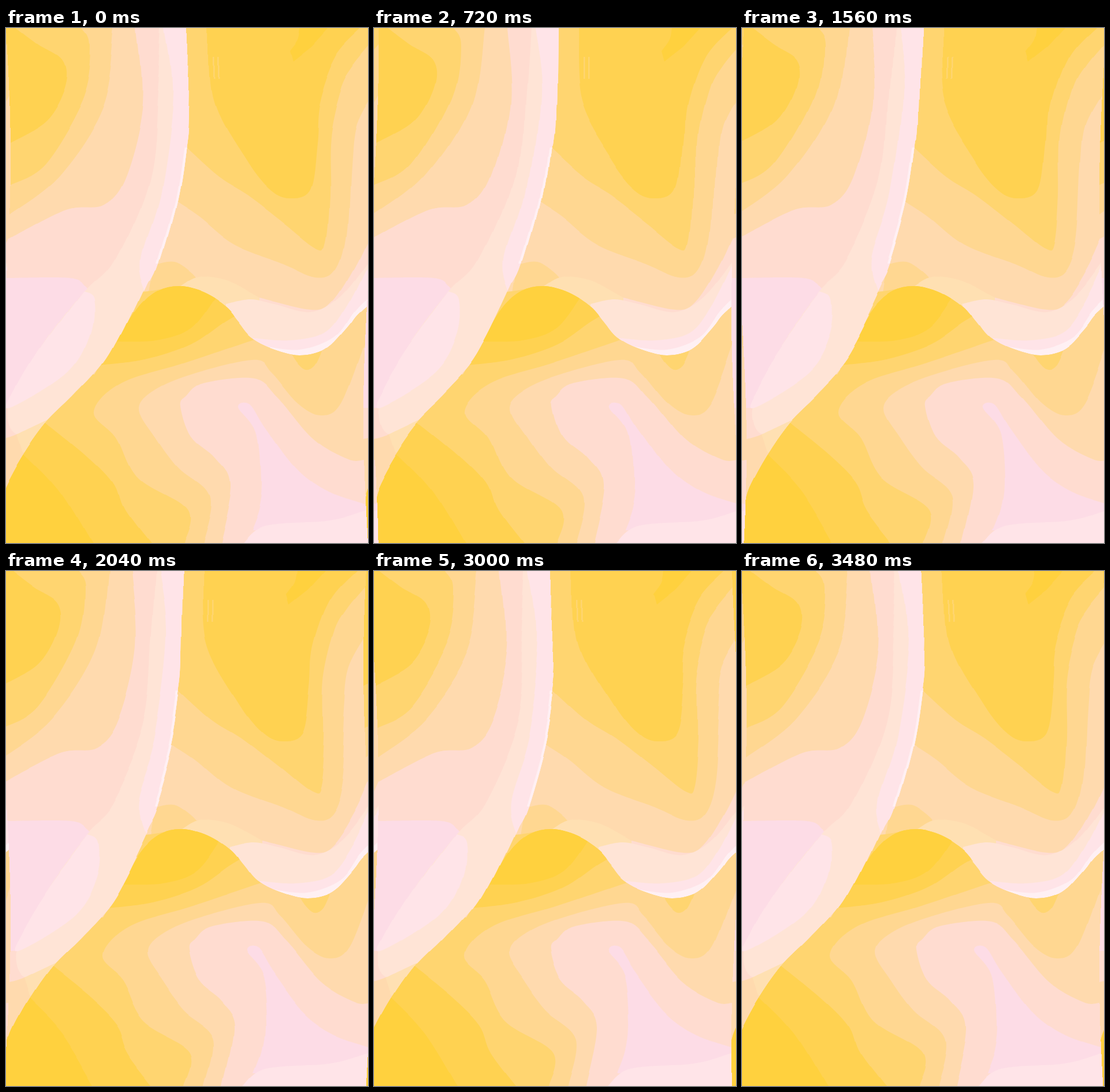
An HTML page with a canvas for the animation above (3600 ms loop, 627 by 892 pixels).

```html
<!DOCTYPE html>
<html lang="en">
<head>
<meta charset="utf-8">
<title>Liquid waves</title>
<style>
  html, body { margin: 0; width: 100%; height: 100%; overflow: hidden; }
  canvas { display: block; width: 627px; height: 892px; }
</style>
</head>
<body>
<canvas id="stage" width="627" height="892"></canvas>
<script>
const W = 627, H = 892, LOOP = 3600, STEP = 120, SWAY = 8;
const gold = '#ffd13e', amber = '#ffd251', honey = '#ffd570', sand = '#ffd791',
  apricot = '#ffdaae', blush = '#ffdcd0', lilac = '#fddce6', cream = '#ffe4d6',
  rose = '#ffe4e8', butter = '#ffe0b2', white = '#fff0f3';

const stage = document.getElementById('stage').getContext('2d');
const artwork = document.createElement('canvas');
artwork.width = W;
artwork.height = H;
const art = artwork.getContext('2d');

const parse = text => text ? text.split(' ').map(p => p.split(',').map(Number)) : [];
const mix = (a, b, t) => a.map((p, i) => p.map((v, k) => v + (b[i][k] - v) * t));
const moved = (points, dx) => points.map(([x, y]) => [x + dx, y]);

// Smooth curve through key points, closed by straight lines through the corners.
function outline(points, corners) {
  const p = typeof points === 'string' ? parse(points) : points;
  const path = new Path2D();
  path.moveTo(...p[0]);
  for (let i = 0; i < p.length - 1; i++) {
    const a = p[i - 1] || p[i], b = p[i], c = p[i + 1], d = p[i + 2] || c;
    path.bezierCurveTo(
      b[0] + (c[0] - a[0]) / 6, b[1] + (c[1] - a[1]) / 6,
      c[0] - (d[0] - b[0]) / 6, c[1] - (d[1] - b[1]) / 6, c[0], c[1]);
  }
  parse(corners).forEach(c => path.lineTo(...c));
  path.closePath();
  return path;
}

function shape(color, points, corners) {
  art.fillStyle = color;
  art.fill(outline(points, corners));
}

function within(path, draw) {
  art.save();
  art.clip(path);
  draw();
  art.restore();
}

function fillAll(color) {
  art.fillStyle = color;
  art.fillRect(0, 0, W, H);
}

const ribbon = parse('312,0 310,150 305.5,207 291,300 261,408 243,447 220,496 197,542 171,584 122,637 75,684 35,741 8,790 0,812');
const wave = parse('160,600 203,528 232,482 264,455 302,447 345,458 384,483 406,509 429,536 465,555 514,567 558,556 594,520 610,499 627,483');

function valley() {
  fillAll(apricot);
  shape(sand, '291,301 330,327 391,375 478,409 534,432 567,420 585,360 592,240 600,170 627,117', '627,0 200,0 200,301');
  shape(honey, '305,207 362,258 413,290 474,337 532,382 548,372 555,290 556,190 575,105 596,66 627,28', '627,0 200,0 200,207');
  shape(amber, '347,0 354,125 407,225 448,278 483,295 520,280 532,200 538,130 567,50 612,0');
  shape(gold, '508,0 504,20 490,40', '495,58 528,32 557,0');
  art.fillStyle = honey;
  for (const x of [355, 363]) art.fillRect(x, 50, 2.5, 38);

  shape(sand, '255,410 290,405 321,425 331,440 329,452', '240,500');
  shape(honey, '238,457 260,454 288,448', '270,470 190,540');
  shape(butter, '302,447 334,431 385,438 440,467 470,480', '440,560');
  shape(blush, '440,467 530,488 565,474 603,415 627,364', '627,600 440,600');
  shape(cream, '383,478 425,470 470,479 530,492 580,465 627,406', '627,600 383,600');
  shape(rose, '433,537 495,541 555,528 592,482 627,412', '627,600 433,600');
  shape(white, '452,551 515,557 573,535 606,492 627,470', '627,600 452,600');
}

// The apricot fold runs midway between the honey and blush folds.
function folds() {
  const outer = parse('435,540 316,580 207,615 160,665 198,710 235,780 318,834 310,892');
  const inner = parse('437,607 350,615 320,637 310,655 328,708 369,745 394,790 375,892');
  const middle = mix(outer, inner, 0.52);
  fillAll(honey);
  shape(sand, outer, '627,892 627,400 435,500');
  shape(apricot, [...parse('627,548 588,650 553,671 513,650 467,597'), ...middle], '627,892');
  shape(blush, [...parse('627,748 600,747 540,712 478,640'), ...inner], '627,892');
  shape(lilac, '429,870 443,830 448,780 440,700 410,657 430,652 458,695 511,765 564,803 627,825', '627,870');
  shape(rose, '627,835 563,853 452,862 412,892', '627,892');

  shape(amber, '73,682 142,738 190,787 210,835 253,892', '0,892 0,682');
  shape(gold, '36,738 95,800 152,892', '0,892 0,738');
  shape(amber, '168,584 246,574 325,548 380,511 400,499', '400,440 168,440');
  shape(gold, '190,543 265,541 324,520 366,466', '366,440 190,440');
  shape(honey, '498,560 511,580 526,592 541,585 553,560');
}

function sheet() {
  fillAll(blush);
  shape(apricot, '223,0 231,130 202,255 163,306 98,315 0,365', '0,0');
  shape(sand, '184,0 163,135 87,255 0,323', '0,0');
  shape(honey, '130,0 143,30 129,120 62,235 0,272', '0,0');
  shape(amber, '16,0 53,28 95,56 98,100 65,160 0,199', '0,0');
  shape(lilac, '0,433 110,433 137,447', '150,460 100,600 13,658 0,658');
  shape(apricot, '0,712 26,704 85,676', '85,830 0,830');
  shape(cream, '265,0 258,110 244,260 187,400 137,456 67,550 13,650 26,703 85,676', '330,600 330,0');
  shape(butter, '26,704 85,676', '85,735 36,735');
  shape(rose, '137,456 155,470 151,530 112,597 14,658 22,625 67,550 137,456');
  shape(rose, '272,0 284,115 263,285 230,400 240,458', '330,420 330,0');
  shape(white, moved(ribbon.slice(2, 5), -4), '330,408 330,207');
}

valley();
within(outline(wave, `${W},${H} 0,${H} 0,600`), folds);
within(outline(ribbon, '0,0'), sheet);

// Each row slides sideways along a travelling sine and wraps around.
function render(time) {
  for (let y = 0; y < H; y++) {
    const shift = Math.round(SWAY * Math.sin(2 * Math.PI * (y / H + time / LOOP)));
    stage.drawImage(artwork, 0, y, W, 1, shift, y, W, 1);
    if (shift) {
      stage.drawImage(artwork, 0, y, W, 1, shift - Math.sign(shift) * W, y, W, 1);
    }
  }
}

let shown = -1;
function tick() {
  const step = Math.floor(performance.now() % LOOP / STEP);
  if (step !== shown) {
    shown = step;
    render(step * STEP);
  }
  requestAnimationFrame(tick);
}
tick();
</script>
</body>
</html>
```
